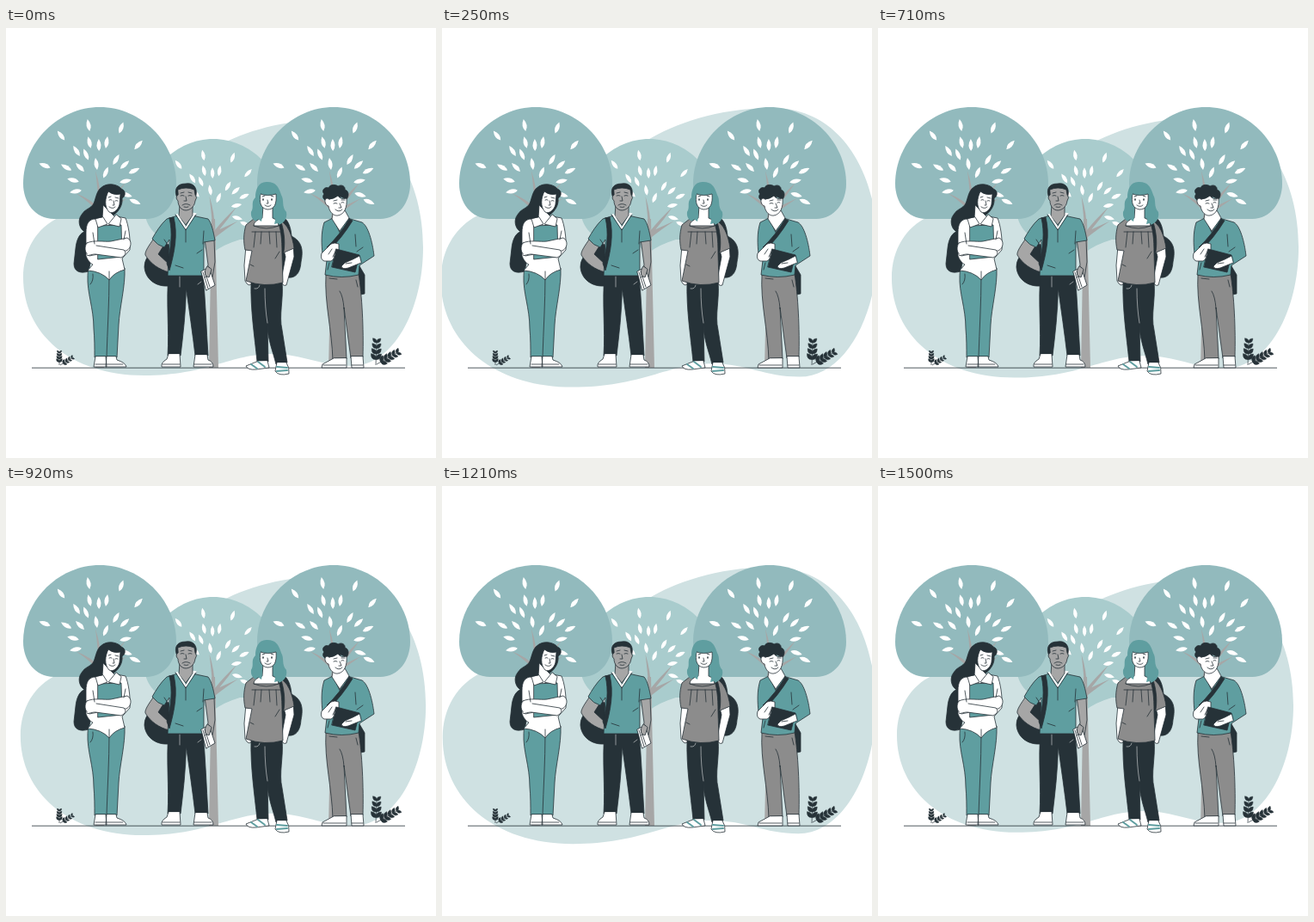
An HTML page for the animation above (1.54 s loop, 500 by 500 pixels).

```html
<!DOCTYPE html>
<html lang="en">
<head>
<meta charset="utf-8">
<title>Students under trees</title>
<style>
html, body { margin: 0; width: 100%; height: 100%; overflow: hidden; background: #fff }
svg { display: block; width: 100vw; height: 100vh }
.people path { stroke: #263238; stroke-width: .8; stroke-linejoin: round; stroke-linecap: round; fill: none }
.people .dark { fill: #263238 }
.people .teal { fill: #5f9ea0 }
.people .gray { fill: #8c8c8c }
.people .skin { fill: #a6a6a6 }
.people .white { fill: #fff }
.people .pale { stroke: #fff; stroke-width: .5 }
.people .hair { stroke: none }
.wood { fill: #a6a6a6 }
.plant { fill: #263238; stroke: #263238; stroke-width: .7 }
</style>
</head>
<body>
<svg viewBox="0 0 500 500">
  <defs>
    <g id="tree">
      <path fill="currentColor" d="M56 222C33 222 20 202 20 181C20 133 61 92 109 92C157 92 198 133 198 181C198 202 185 222 163 222Z"/>
      <path class="wood" d="M105 232L107 214Q98 203 81 192Q100 200 108 209Q107 190 104 166Q111 188 111 210Q122 196 139 180Q128 196 117 209L141 198Q124 209 112 219V232Z"/>
      <g id="leaves" fill="#fff"></g>
    </g>
  </defs>

  <path id="blob" fill="#cfe1e2" d="M20 290C20 258 36 232 62 220C140 194 190 174 240 141C268 124 315 107 370 107C447 105 485 178 485 255C485 328 450 393 402 393C365 393 345 379 310 379C260 379 235 404 160 404C75 404 20 355 20 290Z"/>
  <path fill="#a9cccd" d="M225 243Q229 259 241 261Q252 252 272 246L272 236Z"/>
  <use href="#tree" color="#a9cccd" transform="translate(142.9 46.2) scale(.9)"/>
  <use href="#tree" color="#92babd"/>
  <use href="#tree" color="#92babd" x="272"/>
  <path class="wood" d="M107 222h4l3 173h-10ZM239 222h4l4 173h-11ZM379 222h4l3 173h-11Z"/>
  <path stroke="#263238" stroke-width=".8" d="M30 395.2H464"/>
  <g id="plants" class="plant"></g>

  <g class="people">
    <!-- woman with folder -->
    <path class="dark" d="M95 236C86 236 82 246 81 256L79 274C79 283 86 286 96 283L103 250Z"/>
    <path class="dark" d="M113 184C120 179 132 183 134 187C140 189 139 196 135 198C136 206 131 213 126 217L108 223C104 234 96 240 90 236C85 232 83 223 88 217C92 210 99 210 102 204C105 197 105 188 113 184Z"/>
    <path class="white" d="M113 206L112 221L104 223L118 233L128 221L122 215Z"/>
    <path class="white" d="M119 190C115 198 114 208 120 214C124 217 131 211 132 205L133 193Q125 195 119 190Z"/>
    <path d="M120 200q2-1 3 0M127 201q2-1 3 0M125 201l1 5-2 0M120 208q4 3 7 0M119 197l3-1M127 197l4 1"/>
    <path class="teal" d="M96 279L138 279C139 300 132 325 131 345L129 383L103 383C103 372 103 360 102 350C102 325 94 308 95 288Z"/>
    <path d="M120 288C120 320 118 350 117 382M101 286q1 8-3 12"/>
    <path class="white" d="M104 222C96 222 93 228 93 238L93 265C96 272 99 274 101 275L95 282Q111 283 120 293Q126 284 138 281L135 268L144 258C145 244 142 228 139 221L128 219L118 232Z"/>
    <path class="teal" d="M107 230L134 229L135 266L107 269Z"/>
    <path class="white" d="M104 222L107 232L118 228L113 220ZM128 217L119 228L132 231L134 222Z"/>
    <path class="white" d="M94 250C102 246 114 249 122 248L141 244C147 247 146 256 140 259L122 259C113 263 105 263 97 265C91 262 91 254 94 250Z"/>
    <path class="white" d="M105 253L137 258Q142 263 134 267L104 263C98 263 95 266 94 264"/>
    <path d="M101 238L103 251M139 236L137 246M120 283v9"/>
    <path class="white" d="M104 382L102 394H117L116 382ZM117 382L116 394H140Q139 389 129 386L128 382ZM104 391h12M117 391h19"/>

    <!-- man with books -->
    <path class="dark" d="M184 250C172 260 161 264 161 278C162 292 174 301 189 300L195 255Z"/>
    <path class="skin" d="M171 246C167 252 161 260 162 264C168 274 178 281 190 284Q194 280 191 276L177 263L184 252Z"/>
    <path class="skin" d="M231 245L235 275L233 288Q236 296 240 290L243 272L242 246Z"/>
    <path class="dark" d="M189 286H229C232 318 233 350 235 381H220C217 355 213 328 209.500 303C209 330 206 356 203 381H188C190 350 186 318 189 286Z"/>
    <path d="M202 289l0 12M223 298l4-3" class="pale"/>
    <path class="teal" d="M200 218L187 222C180 228 174 238 170 245Q176 253 184 255L190 246L188 288H230L230 249L243 247C241 236 239 227 235 222L216 218L208 232Z"/>
    <path class="dark" d="M190 221L195 220C200 240 196 261 190 282L187 274C192 256 194 238 190 221Z"/>
    <path class="skin" d="M202 205L201 219L209 229L217 218L217 205Z"/>
    <path d="M199 217L209 233L219 217" style="stroke:#fff;stroke-width:2"/>
    <path d="M197 217L209 235L221 217M209 234v15M230 236l-1 15M222 262l6-4M197 276l9 3M184 246l4 6"/>
    <path class="dark" d="M199 198C195 188 198 181 209 181C219 179 224 188 220 198Z"/>
    <path class="skin" d="M200 188Q209 184 219 188L220 194Q223 197 220 201C219 209 213 212 209 212C204 212 200 207 200 201Q196 197 200 194Z"/>
    <path d="M203 195q2-1 4 0M212 195q2-1 4 0M203 192l4-1M212 191l4 1M209 196l1 5-3 0M205 206q4-3 9 0M207 208q3 1 5 0"/>
    <path class="white" d="M227 283L236 278L243 299L233 305Z"/>
    <path d="M229 284l6 19M231 283l6 18M231 290l4-2"/>
    <path class="skin" d="M234 277Q230 282 232 288L236 290L239 281Z"/>
    <path class="white" d="M189 379L187 385Q180 389 181 394H203L202 379ZM220 380L218 394H241Q241 388 235 386L234 380ZM182 391h20M219 391h20"/>

    <!-- woman with long hair -->
    <path class="dark" d="M316 220C326 217 331 229 332 242C344 248 346 258 343 272C342 287 335 293 323 289Z"/>
    <path class="white" d="M279 254L277 276L278 294Q282 302 286 297L287 256ZM321 250L325 266L320 293Q321 301 326 299L335 266L334 250Z"/>
    <path class="dark" d="M285 295L321 295C323 315 317 334 321 351L327 389L314 391C310 375 304 361 304 345L305 388L292 388C289 358 284 327 285 295Z"/>
    <path class="pale" d="M301 303q0 22 3 40M289 303q5 1 6-4"/>
    <path class="gray" d="M288 222L279 229C276 240 276 248 278 258L286 259L279 294Q300 302 322 296L321 262L335 256C333 242 328 227 317 223Z"/>
    <path class="dark" d="M315 222L319 223C323 234 325 247 323 260L321 262C321 246 320 233 315 222Z"/>
    <path class="teal hair" d="M304 179C294 178 290 187 290 197C284 203 289 208 285 214C284 222 290 227 297 225L311 229C320 231 328 223 326 214C320 207 324 201 320 194C317 184 313 179 304 179Z"/>
    <path class="white" d="M299 207L298 221Q288 224 288 230L317 230Q316 223 310 221L310 207Z"/>
    <path class="white" d="M296 193C294 202 296 210 304 211C312 211 315 205 314 193Q304 196 296 193Z"/>
    <path d="M299 199v1M309 199v1" style="stroke-width:1.5"/>
    <path d="M298 196l3-1M308 195l3 1M304 200l1 4-2 0M301 206q4 3 7 0M288 230Q303 236 317 230M286 237H319M290 237l-2 18M297 237l-1 14M306 237l1 14M314 237l1 18M318 260l-5 8M284 275l4 2"/>
    <path class="teal hair" d="M297 182Q291 194 292 202Q286 209 291 215Q291 222 297 225Q299 217 296 209Q293 199 297 190ZM313 184Q318 196 314 204Q316 214 312 228Q322 227 323 217Q315 207 319 197Z"/>
    <path class="white" d="M294 387L279 393Q281 398 291 397L306 395L304 387ZM315 389L313 399Q317 405 329 402Q330 395 326 389Z"/>
    <path d="M285 391l7 5M293 388l8 6M315 394l12 1M315 399l12-1" style="stroke:#5f9ea0;stroke-width:2"/>

    <!-- man with tablet -->
    <path class="dark" d="M404 265L417 287L417 309L407 311Z"/>
    <path class="gray" d="M372 286H410C414 310 416 350 415 383L401 384L393 325L396 385L380 387C379 350 370 320 372 286Z"/>
    <path d="M388 306Q392 312 393 326M376 291l9 1M407 293l2 8"/>
    <path class="teal" d="M380 221L370 226C366 238 367 252 368 263L373 270L371 287Q390 292 410 287L411 276L428 265C426 248 421 230 414 226L397 221L388 237Z"/>
    <path class="white" d="M381 210L379 222L388 236L399 221L394 212Z"/>
    <path class="dark" d="M399 222L403 224Q390 245 376 258L373 255Q388 241 399 222Z"/>
    <path class="dark" d="M374 202C369 200 367 196 370 193C366 189 371 184 375 186C377 181 384 182 386 184C391 181 395 185 394 188C399 189 399 196 396 199L389 196L376 207Z"/>
    <path class="white" d="M376 199C370 195 369 205 375 207C376 214 381 219 386 218C393 217 397 209 396 198Q389 200 386 195Q381 199 376 199Z"/>
    <path d="M381 204q2-1 4 0M390 203q2-1 3 0M381 201l4-1M390 200l4 0M388 204l2 5-3 0M383 211q4 4 8 0M406 240l1 14M415 255l-7 5M376 273l-2 8"/>
    <path class="white" d="M378 251L367 262Q365 269 370 271L378 271L387 264V251Q382 249 378 251Z"/>
    <path class="dark" d="M384 257L411 264L406 284L379 278Z"/>
    <path class="white" d="M411 265Q404 269 394 273L390 277Q391 281 398 279L413 273Z"/>
    <path d="M379 257l-4 6M384 258l-4 8M395 274l7-1"/>
    <path class="white" d="M381 384L368 391L367 395H396L396 384ZM401 382L402 395H416L415 382ZM369 392h26M402 392h13"/>
  </g>
</svg>
<script>
const byId = id => document.getElementById(id);
const leafPath = (x, y, angle, length, width = length) =>
  `<path d="M-7 0Q-1-5 7 0Q-1 5-7 0Z" transform="translate(${x} ${y}) rotate(${angle}) scale(${length} ${width})"/>`;
const degrees = (dx, dy) => Math.atan2(dy, dx) * 180 / Math.PI;

// Tree leaves point away from the top of the trunk.
const leaves = [[64,125],[96,113],[134,116],[154,136],[97,133],[108,136],[117,133],
  [82,143],[93,147],[128,153],[45,160],[70,162],[86,162],[105,158],[138,159],[116,168],
  [149,166],[78,177],[139,178],[81,190],[150,202],[140,194]];
byId('leaves').innerHTML = leaves.map(([x, y]) =>
  leafPath(x, y, degrees(x - 109, y - 185), 1)).join('');

// A stem with paired leaves that shrink towards its tip.
function sprig(x, y, dx, dy, pairs, size) {
  const angle = degrees(dx, dy);
  let out = `<path d="M${x} ${y}l${dx} ${dy}"/>`;
  for (let i = 1; i <= pairs; i++) {
    const k = i / pairs, s = size * (1.1 - k * .3);
    for (const side of [-1, 1]) {
      const a = angle + side * 42, r = a * Math.PI / 180;
      out += leafPath(x + dx * k + Math.cos(r) * 7 * s, y + dy * k + Math.sin(r) * 7 * s, a, s, s * 1.5);
    }
  }
  return out;
}
byId('plants').innerHTML =
  sprig(430, 392, 1, -26, 4, .62) + sprig(431, 391, 23, -13, 5, .55) +
  sprig(62, 392, 0, -14, 4, .36) + sprig(63, 392, 13, -8, 4, .34);

const LOOP = 1540, STEP = LOOP / 37;
const pulse = [[0, 1], [265, 1.098], [460, 1.06], [710, 1.017], [850, .993],
  [1080, 1.065], [1165, 1.098], [1330, 1.039], [1500, .991], [LOOP, 1]];

function scaleAt(t) {
  const i = pulse.findIndex(([time]) => time > t);
  const [t0, s0] = pulse[i - 1], [t1, s1] = pulse[i];
  return s0 + (s1 - s0) * (t - t0) / (t1 - t0);
}

const start = performance.now();
function draw() {
  const t = (performance.now() - start) % LOOP;
  const held = Math.min(36, Math.floor((t + 4) / STEP)) * STEP;
  byId('blob').setAttribute('transform',
    `translate(252 257) scale(${scaleAt(held)}) translate(-252 -257)`);
  requestAnimationFrame(draw);
}
draw();
</script>
</body>
</html>
```
